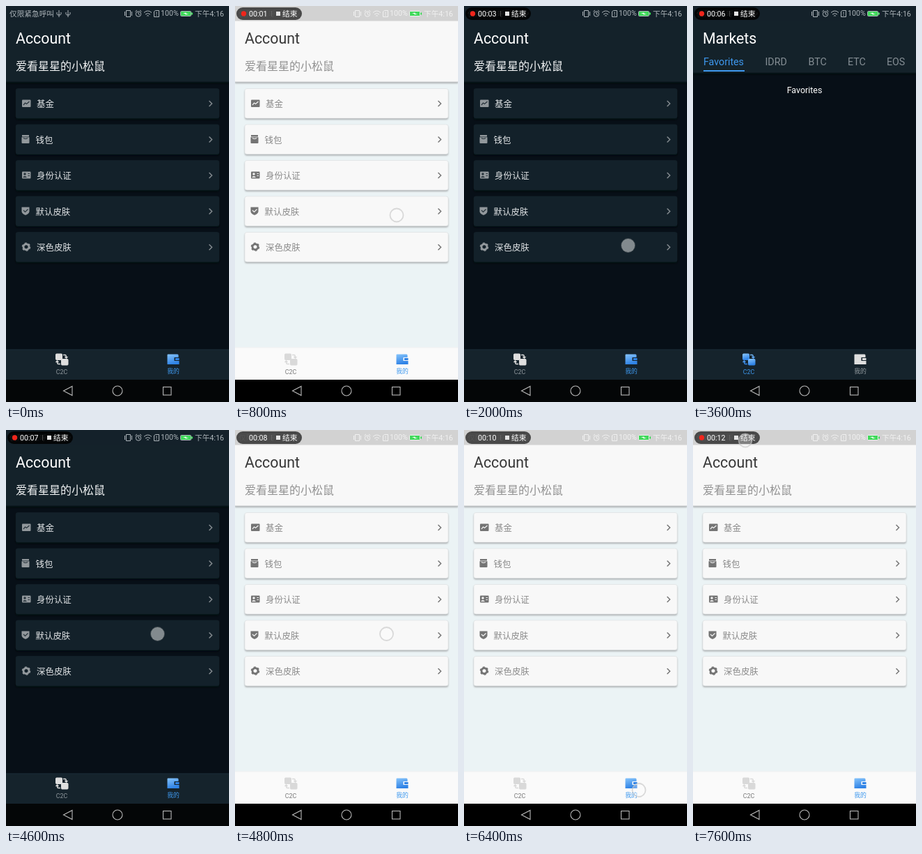
An HTML page for the animation above (7.8 s loop, 320 by 568 pixels).

```html
<!DOCTYPE html>
<html lang="zh-CN">
<head>
<meta charset="utf-8">
<title>Theme switching</title>
<style>
html, body { margin: 0; width: 100%; height: 100%; overflow: hidden; background: #000; }
svg { display: block; width: 320px; height: 568px; }
text { font-family: Roboto, 'Noto Sans CJK SC', 'Noto Sans CJK', sans-serif; }
.dark {
  --status: #14212a; --statusText: #adb5ba; --head: #14222a; --body: #070f17; --card: #13212a;
  --cardLine: #13212a; --edge: #0b151c; --shadow: #050b11; --title: #fff; --user: #f1f3f4;
  --item: #e2e5e7; --icon: #92989c; --mark: #26323a; --chevron: #82898e; --bar: #15232c;
  --barLine: #1a2b36; --barTop: 492.5px; --off: #dedede; --label: #929a9f; --tab: #858e94;
  --nav: #040607; --pill: .85; --touch: rgba(205,208,210,.6); --ring: rgba(150,154,156,.38);
}
.light {
  --status: #d2d2d2; --statusText: #f1f1f1; --head: #f8f8f8; --body: #ebf3f5; --card: #f8f8f8;
  --cardLine: #dfe1e2; --edge: #c6c9ca; --shadow: #abafb1; --title: #373737; --user: #929292;
  --item: #8a8a8a; --icon: #747474; --mark: #f4f4f4; --chevron: #777; --bar: #fafafa;
  --barLine: #eff1f2; --barTop: 489.5px; --off: #d9d9d9; --label: #777; --tab: #8c8c8c;
  --nav: #000; --pill: .65; --touch: rgba(255,255,255,.3); --ring: rgba(195,195,195,.6);
}
.bar { y: var(--barTop); }
</style>
</head>
<body>
<svg id="stage" viewBox="0 0 320 568" class="dark">
  <defs>
    <linearGradient id="blue" x2=".3" y2="1">
      <stop offset="0" stop-color="#86c4fb"/><stop offset="1" stop-color="#2f83e6"/>
    </linearGradient>
    <filter id="soft" x="-10%" y="-30%" width="120%" height="170%"><feGaussianBlur stdDeviation="1.2"/></filter>
  </defs>
  <rect width="320" height="568" fill="var(--body)"/>
  <g id="account"></g>
  <g id="markets"></g>

  <rect width="320" height="21.5" fill="var(--status)"/>
  <g fill="var(--statusText)" font-size="10.67">
    <text x="5" y="15">仅限紧急呼叫</text>
    <text x="222" y="14.3">100%</text>
    <text x="271" y="15">下午4:16</text>
  </g>
  <g fill="none" stroke="var(--statusText)">
    <path id="usb" d="M76 6V16M73 9V11.5Q73 13 76 13T79 11.5V9"/>
    <use href="#usb" x="13"/>
    <path d="M172.500 6.500H178.500V15.500H172.500ZM170.500 8V14M180.500 8V14"/>
    <circle cx="190" cy="11.500" r="3.700"/>
    <path d="M190 9V11.500L192 12.500M185.500 8L188 6M192 6L194.500 8"/>
    <path d="M198 9.500Q203.500 4.500 209 9.500M200 12Q203.500 9 207 12M202 14.300Q203.500 13 205 14.300"/>
    <path d="M212.500 8L214.500 6.500H219.500V15.500H212.500ZM216 8.500V11.500M216 12.500V14"/>
    <rect x="250.500" y="7.500" width="15" height="7" rx="1"/>
  </g>
  <rect x="251" y="8" width="14" height="6" fill="#3fd95a"/>
  <rect x="266" y="9.500" width="2" height="3" fill="#3fd95a"/>
  <path d="M254 10.500L258.500 9.500V11L262 11.300L257.500 12.500V11.200Z" fill="#fff"/>

  <g id="pill">
    <rect x="2" y="2" width="94" height="18" rx="9" fill="#000" fill-opacity="var(--pill)"/>
    <circle id="dot" cx="12.500" cy="11" r="3.700" fill="#f0261c"/>
    <path d="M52.500 7V15" stroke="#777" stroke-width=".6"/>
    <rect x="59" y="8" width="6" height="6" fill="#e4e4e4"/>
    <g fill="#fff" font-size="10.67">
      <text id="clock" x="20" y="14.800"></text>
      <text x="68" y="15">结束</text>
    </g>
  </g>

  <rect class="bar" width="320" height="48" fill="var(--bar)"/>
  <rect class="bar" width="320" height="1" fill="var(--barLine)"/>
  <g id="c2c">
    <rect x="71.500" y="499" width="9" height="8.500" rx="1"/>
    <rect x="79.500" y="506.500" width="9.500" height="8.500" rx="1"/>
    <path d="M82 500.500H85Q86.500 500.500 86.500 504.500M84.500 503L86.500 505L88.500 503M78 513.500H75Q73.500 513.500 73.500 510M71.500 511L73.500 509L75.500 511" fill="none" stroke-width="1.400"/>
    <text x="80" y="528" font-size="8.890" text-anchor="middle" stroke="none">C2C</text>
  </g>
  <g id="mine">
    <path d="M232.500 499.500H246Q247.500 499.500 247.500 501V504H241.500V509H248.500V514H231.500V500.500Q231.500 499.500 232.500 499.500Z"/>
    <rect x="243" y="505" width="5.500" height="3"/>
    <text x="240" y="527.300" font-size="8.890" text-anchor="middle">我的</text>
  </g>

  <rect y="536" width="320" height="32" fill="var(--nav)"/>
  <g fill="none" stroke="#b9b9b9" stroke-width="1.100">
    <path d="M82.500 552L95 545.500V558.500Z"/>
    <circle cx="160" cy="552" r="7"/>
    <rect x="225.500" y="546.500" width="11.500" height="11.500"/>
  </g>
  <circle id="touch" r="9.500" fill="var(--touch)" stroke="var(--ring)" stroke-width="1.800"/>
</svg>
<script>
const LOOP = 7800, STEP = 200;
const $ = id => document.getElementById(id);

const text = (x, y, size, fill, content, extra = '') =>
  `<text x="${x}" y="${y}" font-size="${size}" fill="${fill}" ${extra}>${content}</text>`;

const header = (height, title) => `
  <rect y="2" width="320" height="${height}" fill="var(--shadow)" filter="url(#soft)"/>
  <rect width="320" height="${height}" fill="var(--head)"/>
  <path d="M0 ${height}H320" stroke="var(--edge)"/>` +
  text(14, 54, 21.33, 'var(--title)', title);

// Icons are centred on 0,0; "mark" strokes are cut out of the body.
const mark = d => `<path d="${d}" fill="none" stroke="var(--mark)" stroke-width="1.2"/>`;
const icons = [
  '<rect x="-6" y="-5" width="12.500" height="10.500" rx="1"/>' + mark('M-4 2.500L-1.500 -.5L.5 1L4.500 -2.500'),
  '<path d="M-5 -6H5V-3.500H-5ZM-5.500 -2.800H5.500V5Q5.500 6 4.500 6H-4.500Q-5.500 6 -5.500 5Z"/>' + mark('M-3 -1.500Q0 .5 3 -1.500'),
  '<rect x="-6" y="-5" width="12.500" height="10" rx="1"/><g fill="var(--mark)"><circle cx="-2" cy="-1.500" r="1.700"/><path d="M-5 3.500Q-2 -.5 1 3.500Z"/></g>' + mark('M2.500 -2H5M2.500 1H5'),
  '<path d="M-5.500 -5.500H5.500V1Q5 4 0 6Q-5 4 -5.500 1Z"/>' + mark('M-3 -1L-.5 1.500L3.500 -2.500'),
  '<circle r="4" fill="none" stroke="var(--icon)" stroke-width="2.800"/><circle r="5.500" fill="none" stroke="var(--icon)" stroke-width="1.600" stroke-dasharray="2.880 2.880"/>'
];

const card = (label, i) => {
  const y = 118.5 + i * 51.5;
  return `
    <rect x="14" y="${y + 2}" width="292" height="42.500" rx="3" fill="var(--shadow)" filter="url(#soft)"/>
    <rect x="14" y="${y}" width="292" height="42.500" rx="3" fill="var(--card)" stroke="var(--cardLine)" stroke-width=".7"/>
    <g transform="translate(${i % 2 ? 28 : 29} ${y + 21})" fill="var(--icon)">${icons[i]}</g>
    <path d="M291.500 ${y + 17.500}L295.500 ${y + 21.500}L291.500 ${y + 25.500}" fill="none" stroke="var(--chevron)" stroke-width="1.500"/>` +
    text(i % 2 ? 42.5 : 44, y + 26.5, 12.44, 'var(--item)', label);
};

$('account').innerHTML = header(109, 'Account') +
  text(14, 92, 16, 'var(--user)', '爱看星星的小松鼠') +
  ['基金', '钱包', '身份认证', '默认皮肤', '深色皮肤'].map(card).join('');

$('markets').innerHTML = header(96, 'Markets') +
  [['Favorites', 15], ['IDRD', 103.5], ['BTC', 165.5], ['ETC', 222], ['EOS', 278]]
    .map(([name, x], i) => text(x, 85, 14.22, i ? 'var(--tab)' : '#3e98ee', name)).join('') +
  '<rect x="15" y="92" width="59" height="2" fill="#3e98ee"/>' +
  text(160, 125.3, 12.44, 'var(--title)', 'Favorites', 'text-anchor="middle"');

// Each tap: time, position and what it switches.
const taps = [
  { at: 800, x: 232, y: 300, theme: 'light' },
  { at: 2000, x: 235.5, y: 343.5, theme: 'dark' },
  { at: 3000, x: 84, y: 512, page: 'markets' },
  { at: 4200, x: 247, y: 514, page: 'account' },
  { at: 4800, x: 217.5, y: 292.5, theme: 'light' },
  { at: 5600, x: 84, y: 512, page: 'markets' },
  { at: 6400, x: 251, y: 516.5, page: 'account' },
  { at: 7600, x: 75, y: 15 }
];

const show = (id, on) => $(id).setAttribute('display', on ? 'inline' : 'none');
const tint = (id, on) => {
  const el = $(id), color = on ? 'url(#blue)' : 'var(--off)';
  el.setAttribute('fill', color);
  el.querySelector('text').setAttribute('fill', on ? '#3e98ee' : 'var(--label)');
  return color;
};

function render(ms) {
  const t = Math.floor((ms % LOOP) / STEP) * STEP;
  const state = { theme: 'dark', page: 'account' };
  for (const tap of taps) {
    if (tap.at > t) break;
    state.theme = tap.theme || state.theme;
    state.page = tap.page || state.page;
  }
  const onMarkets = state.page === 'markets';
  $('stage').setAttribute('class', state.theme);
  show('account', !onMarkets);
  show('markets', onMarkets);
  $('c2c').setAttribute('stroke', tint('c2c', onMarkets));
  tint('mine', !onMarkets);
  $('mine').querySelector('rect').setAttribute('fill', onMarkets ? 'var(--off)' : '#2f83e6');

  const seconds = Math.floor(t * 0.0016 + 0.4);
  $('clock').textContent = '00:' + String(seconds).padStart(2, '0');
  show('pill', t >= STEP);
  show('dot', t % 1600 >= 400);

  const touch = taps.find(tap => t >= tap.at - STEP && t < tap.at + STEP);
  show('touch', touch);
  if (touch) {
    $('touch').setAttribute('cx', touch.x);
    $('touch').setAttribute('cy', touch.y);
  }
}

const start = performance.now();
function tick() {
  render(performance.now() - start);
  requestAnimationFrame(tick);
}
tick();
</script>
</body>
</html>
```
